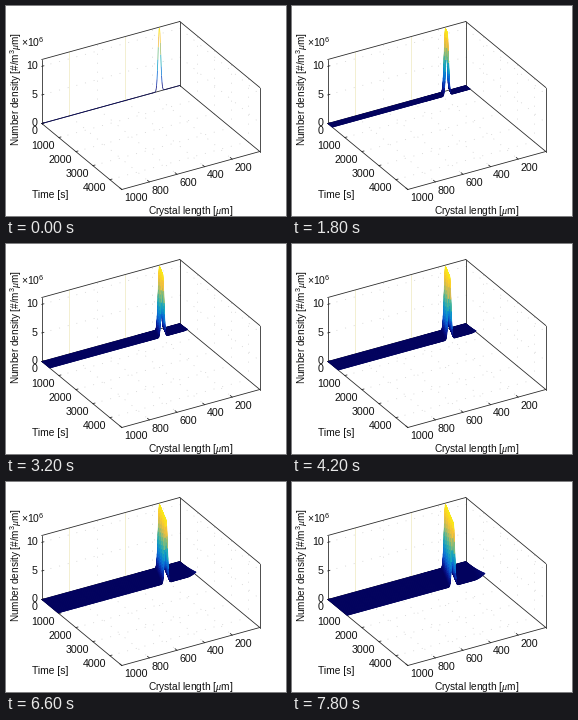
Recreate the animation shown at these times as a matplotlib script. Size 280x210 px, loop 8 s.

```python
import numpy as np
import matplotlib.pyplot as plt
from matplotlib.animation import FuncAnimation
from matplotlib.collections import LineCollection, PolyCollection
from matplotlib.colors import LinearSegmentedColormap

W, H, DPI = 280, 210, 100
FRAMES, STEP_MS = 40, 200
L_MAX, T_MAX, Z_MAX = 1000, 4700, 11.2
DT = 29            # simulated seconds per frame
GROWTH = 0.0725    # um per second
SEED_SIZE, SPREAD, PEAK = 148, 9.4, 11.1
INK, TEXT = "#262626", "#101010"

plt.rcParams.update({
    "font.family": "Liberation Sans",
    "mathtext.fontset": "custom",
    "mathtext.rm": "Liberation Sans",
    "mathtext.it": "Liberation Serif:italic",
})

cmap = LinearSegmentedColormap.from_list("density", [
    (0.00, "#02025e"), (0.10, "#0a1490"), (0.22, "#0a5cd8"),
    (0.38, "#0c98d2"), (0.50, "#1fb3b0"), (0.62, "#86bf78"),
    (0.76, "#f2ba48"), (0.86, "#fdcb2c"), (1.00, "#f8f810"),
])


def px(size):
    """Pixels to points."""
    return size * 72 / DPI


def project(length, time, z):
    u = 1 - np.asarray(length) / L_MAX
    v = np.asarray(time) / T_MAX
    x = 35.8 + 138 * u + 80 * v
    y = 117.5 - 38 * u + 66 * v - 64 * np.asarray(z) / Z_MAX
    return np.stack(np.broadcast_arrays(x, y), axis=-1)


def density(length, time):
    """Growing seed crystals plus newly nucleated fines."""
    grown = GROWTH * time
    seeds = PEAK * np.exp(-((length - SEED_SIZE - grown) / SPREAD) ** 2 / 2)
    age = np.clip(time - length / GROWTH, 0, None) / (FRAMES * DT)
    return seeds + 0.75 * age ** 2


fig = plt.figure(figsize=(W / DPI, H / DPI), dpi=DPI, facecolor="white")
ax = fig.add_axes([0, 0, 1, 1])
ax.set_xlim(0, W)
ax.set_ylim(H, 0)
ax.axis("off")


def line(a, b, color=INK, width=0.8, **kw):
    p = project(*np.transpose([a, b]))
    ax.plot(p[:, 0], p[:, 1], color=color, lw=px(width), **kw)


def grid(a, b):
    line(a, b, "#d2d2d2", 0.8, ls=(0, (1.2, 10)), zorder=1)


def label(x, y, text, size=10.6, **kw):
    ax.text(x, y, text, fontsize=px(size), color=TEXT, **kw)


def draw_axes():
    for s in (200, 400, 600, 800):
        grid((s, 0, 0), (s, T_MAX, 0))
        if s in (400, 800):
            line((s, 0, 0), (s, 0, Z_MAX), "#f3efd2", 1, zorder=1)
        else:
            grid((s, 0, 0), (s, 0, Z_MAX))
    for t in (1000, 2000, 3000, 4000):
        grid((L_MAX, t, 0), (0, t, 0))
        grid((0, t, 0), (0, t, Z_MAX))
    for z in (5, 10):
        grid((L_MAX, 0, z), (0, 0, z))
        grid((0, 0, z), (0, T_MAX, z))

    corners = [(L_MAX, 0), (0, 0), (0, T_MAX), (L_MAX, T_MAX)]
    for i, (a, b) in enumerate(zip(corners, corners[1:] + corners[:1])):
        line((*a, 0), (*b, 0), zorder=2)
        if i < 2:
            line((*a, Z_MAX), (*b, Z_MAX), zorder=2)
        if i < 3:
            line((*a, 0), (*a, Z_MAX), zorder=2)

    for s in (1000, 800, 600, 400, 200):
        line((s, T_MAX, 0), (s, T_MAX - 110, 0), zorder=2)
        x, y = project(s, T_MAX, 0)
        label(x + 2.5, y + 7.7, str(s), va="center_baseline")
    for t in (0, 1000, 2000, 3000, 4000):
        line((L_MAX, t, 0), (L_MAX - 15, t, 0), zorder=2)
        x, y = project(L_MAX, t, 0)
        label(x - 4, y + 7, str(t), ha="right", va="center_baseline")
    for z in (0, 5, 10):
        line((L_MAX, 0, z), (L_MAX - 15, 0, z), zorder=2)
        x, y = project(L_MAX, 0, z)
        label(x - 4, y - 1, str(z), ha="right", va="center_baseline")

    label(15, 41, r"×10$^{\mathrm{6}}$", 10.4)
    label(18.5, 140, r"Number density [#/m$^{\mathrm{3}}\mu$m]", 10,
          rotation=90, ha="right", va="bottom")
    label(44.5, 192, "Time [s]", 10.2, ha="center")
    label(184.5, 207.5, r"Crystal length [$\mu$m]", 10.1, ha="center")


draw_axes()
sheet = PolyCollection([], linewidths=px(0.5), zorder=3)
front = LineCollection([], linewidths=px(0.75), zorder=4)
ax.add_collection(sheet, autolim=False)
ax.add_collection(front, autolim=False)

# Fine steps around the peak, coarse ones on the flat tail; far to near.
sizes = np.concatenate([np.arange(0, 320, 3), np.arange(320, 1001, 85)])
times = np.arange(FRAMES) * DT
field = density(sizes[None, :], times[:, None])
points = project(sizes[None, :], times[:, None], field)
quads = np.stack([points[:-1, :-1], points[:-1, 1:],
                  points[1:, 1:], points[1:, :-1]], axis=2)
quad_z = (field[:-1, :-1] + field[:-1, 1:]
          + field[1:, 1:] + field[1:, :-1]) / 4
quad_rgb = cmap(quad_z / Z_MAX)
edges = np.stack([points[:, :-1], points[:, 1:]], axis=2)
edge_rgb = cmap((field[:, :-1] + field[:, 1:]) / 2 / Z_MAX)


def update(n):
    rgb = quad_rgb[:n].reshape(-1, 4)
    sheet.set_verts(quads[:n].reshape(-1, 4, 2))
    sheet.set_facecolor(rgb)
    sheet.set_edgecolor(rgb)
    front.set_segments(edges[n])
    front.set_color(edge_rgb[n])
    return sheet, front


anim = FuncAnimation(fig, update, frames=FRAMES, interval=STEP_MS,
                     init_func=lambda: update(0), repeat=True, repeat_delay=0)
plt.show()
```
